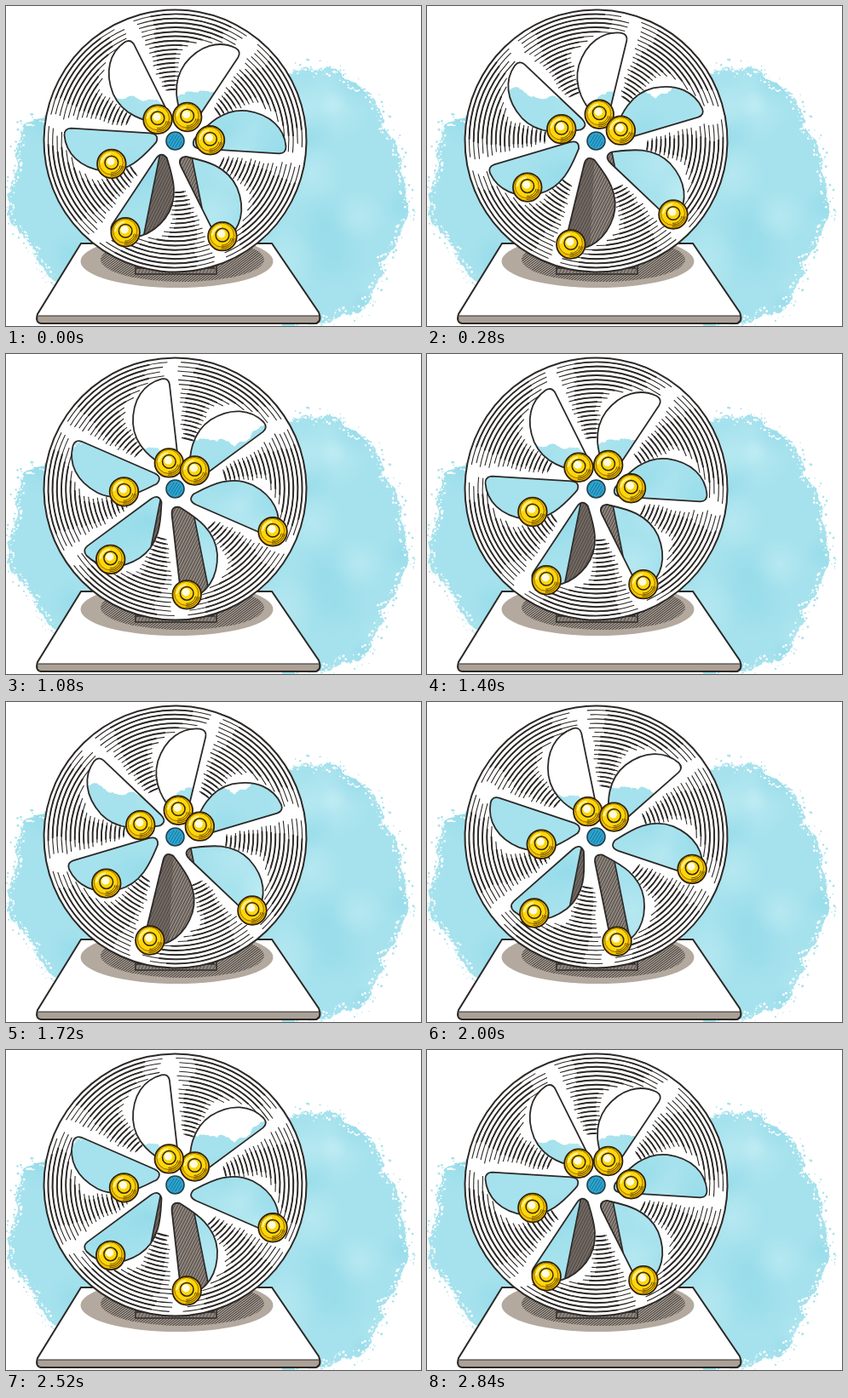
An HTML page with a canvas for the animation above (2880 ms loop, 487 by 376 pixels).

```html
<!DOCTYPE html>
<html lang="en">
<head>
<meta charset="utf-8">
<title>Overbalanced wheel</title>
<style>
html, body { margin: 0; width: 100%; height: 100%; overflow: hidden; background: #fff; }
canvas { display: block; width: 487px; height: 376px; }
</style>
</head>
<body>
<canvas id="stage" width="487" height="376"></canvas>
<script>
const W = 487, H = 376, CX = 198.5, CY = 158.5, R = 154;
const STEP = 40, STEPS = 72, PHASE = 6;
const INNER = 31, OUTER = 125;
const INK = '#2c2927', WASH = '#a6e2ed';
const ctx = document.getElementById('stage').getContext('2d');

const rad = d => d * Math.PI / 180;
const lerp = (a, b, k) => a + (b - a) * k;
const ramp = (a, b, x) => Math.min(1, Math.max(0, (x - a) / (b - a)));
const ease = k => (1 - Math.cos(Math.PI * k)) / 2;

function seeded(seed) {
  return () => {
    seed = (seed * 1664525 + 1013904223) >>> 0;
    return seed / 4294967296;
  };
}

function paint(c, path, fill, line, width = 2) {
  if (fill) { c.fillStyle = fill; c.fill(path, 'nonzero'); }
  if (line) { c.strokeStyle = line; c.lineWidth = width; c.stroke(path); }
}

function ellipse(x, y, rx, ry = rx) {
  const path = new Path2D();
  path.ellipse(x, y, rx, ry, 0, 0, 2 * Math.PI);
  return path;
}

function circle(c, x, y, r, fill, line, width) {
  paint(c, ellipse(x, y, r), fill, line, width);
}

// Parallel slanted strokes inside a shape
function hatch(c, shape, [x, y, w, h], gap, slope, color, width) {
  c.save();
  c.clip(shape);
  c.beginPath();
  for (let i = x - slope * h; i < x + w; i += gap) {
    c.moveTo(i, y + h);
    c.lineTo(i + slope * h, y);
  }
  c.strokeStyle = color;
  c.lineWidth = width;
  c.stroke();
  c.restore();
}

// Ellipse with an edge torn by midpoint displacement
function tornEllipse(cx, cy, rx, ry, rnd) {
  let points = Array.from({ length: 16 }, (_, i) => {
    const a = i * Math.PI / 8;
    return [cx + rx * Math.cos(a), cy + ry * Math.sin(a)];
  });
  for (let depth = 0; depth < 5; depth++) {
    points = points.flatMap(([x, y], i) => {
      const [u, v] = points[(i + 1) % points.length];
      const k = (rnd() - 0.4) * 0.4;
      return [[x, y], [(x + u) / 2 + (v - y) * k, (y + v) / 2 - (u - x) * k]];
    });
  }
  return points;
}

function drawWash(c) {
  const rnd = seeded(23);
  const edges = [
    tornEllipse(112, 216, 107, 117, rnd),
    tornEllipse(225, 202, 150, 100, rnd),
    tornEllipse(350, 222, 118, 150, rnd)
  ];
  const shape = new Path2D();
  for (const edge of edges) {
    edge.forEach(([x, y], i) => i ? shape.lineTo(x, y) : shape.moveTo(x, y));
    shape.closePath();
  }
  paint(c, shape, WASH);

  c.save();
  c.clip(shape);
  for (let i = 0; i < 40; i++) {
    const x = rnd() * 470, y = 90 + rnd() * 270, r = 15 + rnd() * 35;
    const g = c.createRadialGradient(x, y, 0, x, y, r);
    const rgb = rnd() < 0.55 ? '205,241,247' : '135,213,231';
    g.addColorStop(0, `rgba(${rgb},.4)`);
    g.addColorStop(1, `rgba(${rgb},0)`);
    c.fillStyle = g;
    c.fillRect(x - r, y - r, 2 * r, 2 * r);
  }
  c.restore();

  // Dry-brush grain: white flecks just inside, blue ones just outside
  for (const [x, y] of [...edges[0], ...edges[2]]) {
    const out = rnd() < 0.3, spread = out ? 0.07 * rnd() : -0.06 * rnd();
    if (x > 90 && x < 300) continue;
    const mid = x < 200 ? 112 : 350;
    circle(c, x + (x - mid) * spread, y + (y - 220) * spread, 0.4 + rnd() * 1.1, out ? WASH : '#fff');
  }
}

function drawStand(c) {
  const base = new Path2D('M88 279H312L367 360Q371 370 364 373H41Q34 372 37 362Z');
  const front = new Path2D('M37 364H368Q369 371 364 373H41Q36 372 37 364Z');
  paint(c, base, '#fff');
  paint(c, front, '#aba197');
  c.save();
  c.clip(base);
  paint(c, ellipse(200.5, 300, 113, 31), '#b3a99e');
  hatch(c, ellipse(207, 298, 96, 26), [100, 270, 210, 60], 3.6, 1.3, '#4c4642', 1.1);
  c.restore();
  paint(c, base, null, INK, 2);
  paint(c, new Path2D('M38 364H367'), null, INK, 1.2);

  const foot = new Path2D('M152 304H247V315H152Z');
  paint(c, foot, '#8f867e', INK, 1.5);
  hatch(c, foot, [152, 304, 95, 12], 4, 0.5, '#4c4642', 0.9);
  const post = new Path2D('M181 172H217L244 308H154Z');
  paint(c, post, '#8d847c');
  paint(c, new Path2D('M181 172H197L190 308H154Z'), 'rgba(50,45,41,.3)');
  hatch(c, post, [150, 170, 100, 140], 3.4, 0.5, '#4c4642', 1);
  paint(c, post, null, INK, 1.6);
}

function makeDisc() {
  const slot = new Path2D('M123 2L30 6Q19 6 22 -4C34 -20 50 -44 80 -44C108 -43 126 -28 130 -7Q131 1 123 2Z');
  const rim = ellipse(0, 0, R), holes = new Path2D();
  for (let i = 0; i < 6; i++) holes.addPath(slot, new DOMMatrix().rotate(i * 60));
  const body = new Path2D(rim);
  body.addPath(holes);
  return { rim, holes, body };
}

// Six groups of tapering arcs, each running from one slot to the next
function makeGrooves() {
  const rnd = seeded(7), thin = new Path2D(), thick = new Path2D();
  const add = (path, r, a, b) => {
    path.moveTo(r * Math.cos(rad(a)), r * Math.sin(rad(a)));
    path.arc(0, 0, r, rad(a), rad(b));
  };
  for (let i = 0; i < 6; i++) {
    for (let r = 149; r > 56; r -= 5.2) {
      const a = i * 60 + Math.asin(11 / r) * 57.3 + rnd() * 3;
      const b = i * 60 + lerp(26, 55, ramp(98, 132, r) ** 2) + rnd() * ramp(60, 150, r) * 6;
      add(thin, r, a, b);
      add(thick, r, lerp(a, b, 0.15), lerp(a, b, 0.85));
    }
  }
  return { thin, thick };
}

// A ball drops outward along the straight edge, then rides home on the curved one
function ballAt(angle) {
  const a = angle % 360;
  const out = ease(ramp(1, 25, a)), home = ease(ramp(107, 252, a));
  const x = lerp(INNER, OUTER, out - home);
  const bulge = home > 0 && home < 1 ? Math.sqrt(Math.sin(Math.PI * home)) : 0;
  const y = -5 - 30 * bulge;
  const c = Math.cos(rad(a)), s = Math.sin(rad(a));
  return [CX + x * c - y * s, CY + x * s + y * c];
}

function drawBall(x, y) {
  const arc = (r, from, to, color, width) => {
    const path = new Path2D();
    path.arc(x, y, r, rad(from), rad(to));
    paint(ctx, path, null, color, width);
  };
  circle(ctx, x, y, 16.8, '#f8c000', '#2e220a', 1.8);
  circle(ctx, x - 0.5, y - 1.5, 14, '#ffd60a', '#7a5800', 0.8);
  for (let r = 10.5; r < 16; r += 2) arc(r, 10, 95, '#6b4c00', 1);
  arc(12, 185, 265, '#fff3a8', 2);
  circle(ctx, x, y - 1.5, 7.8, '#ffd60a', '#33260a', 1.5);
  circle(ctx, x - 1, y - 3, 4.6, '#fffbe0');
}

function drawHub() {
  circle(ctx, CX, CY, 10.5, '#2ba6d0', '#24404c', 1.6);
  hatch(ctx, ellipse(CX, CY, 8), [CX - 8, CY - 8, 16, 16], 3.5, 0.6, '#1b7199', 1);
}

const { rim, holes, body } = makeDisc();
const { thin, thick } = makeGrooves();
const scene = document.createElement('canvas');
scene.width = W;
scene.height = H;
const back = scene.getContext('2d');
back.fillStyle = '#fff';
back.fillRect(0, 0, W, H);
drawWash(back);
drawStand(back);

function draw(turn) {
  ctx.drawImage(scene, 0, 0);
  ctx.save();
  ctx.translate(CX, CY);
  ctx.rotate(rad(turn));
  ctx.fillStyle = '#fff';
  ctx.fill(body, 'evenodd');
  paint(ctx, thin, null, INK, 1.1);
  paint(ctx, thick, null, INK, 1.9);
  paint(ctx, holes, null, INK, 1.8);
  paint(ctx, rim, null, INK, 2);
  ctx.restore();
  drawHub();
  for (let i = 0; i < 6; i++) drawBall(...ballAt(turn + i * 60));
}

const start = performance.now();
function tick() {
  const step = Math.floor((performance.now() - start) / STEP) % STEPS;
  // The rest pose lasts two steps: the last one and the first
  draw(PHASE + (step ? (step + 1) * 5 : 0));
  requestAnimationFrame(tick);
}
tick();
</script>
</body>
</html>
```
